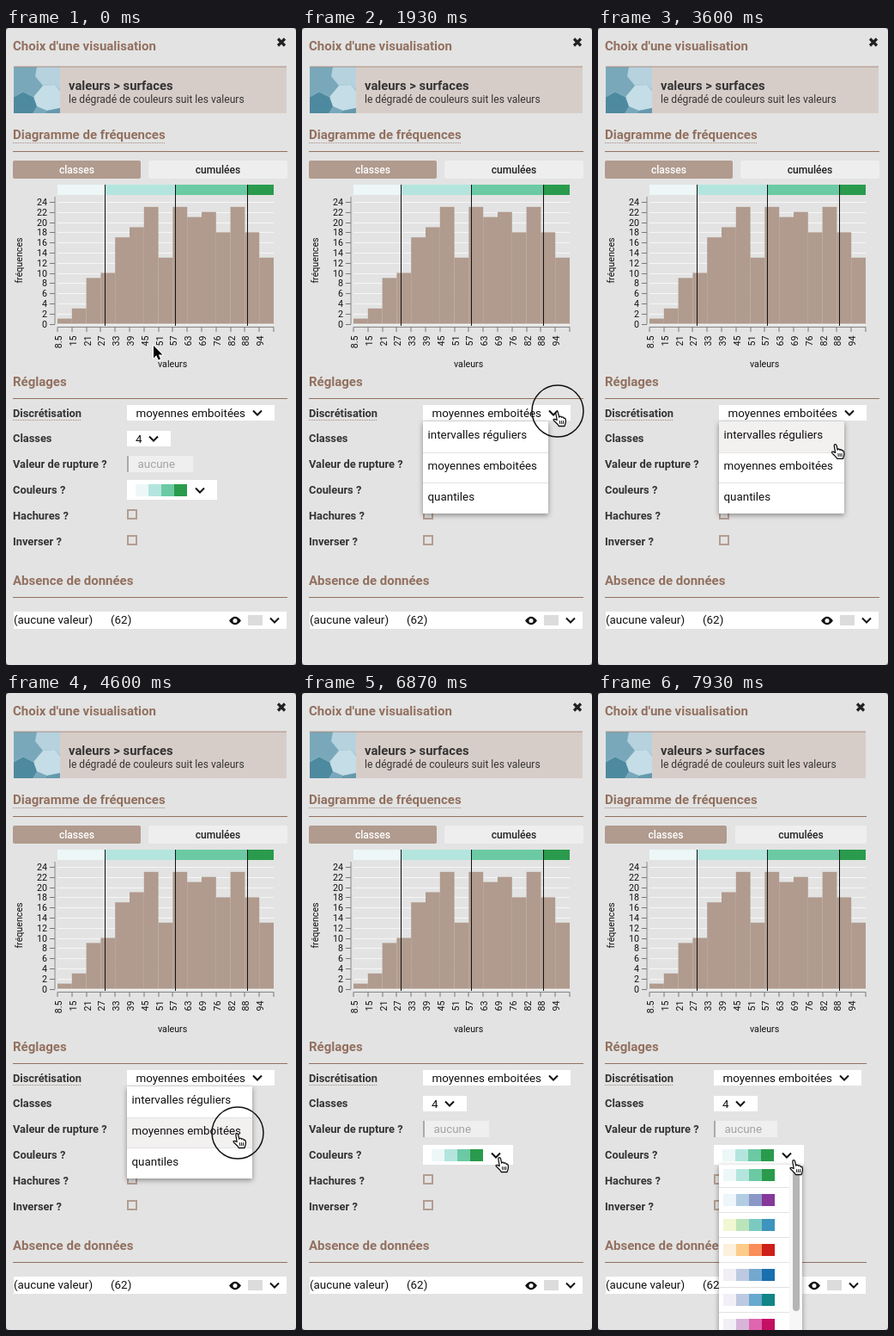
Write an HTML page with a canvas that moves like this. It is 338 px wide and 740 px high and loops after 8 s.

```html
<!DOCTYPE html>
<html lang="fr">
<head>
<meta charset="utf-8">
<title>Choix d'une visualisation</title>
<style>
html, body { margin: 0; width: 100%; height: 100%; overflow: hidden; background: #555; }
canvas { display: block; width: 338px; height: 740px; }
</style>
</head>
<body>
<canvas id="stage"></canvas>
<script>
const W = 338, H = 740, LOOP = 8000;
const canvas = document.getElementById('stage');
const ctx = canvas.getContext('2d');
const ratio = window.devicePixelRatio || 1;
canvas.width = W * ratio;
canvas.height = H * ratio;

const BG = '#e3e3e3', BROWN = '#92705f', TAN = '#b09b8e', INK = '#333';
const GREENS = ['#edf7f8', '#b3e5de', '#6bcaa3', '#2a9b4c'];
const RAMPS = [
  GREENS,
  ['#edf6fa', '#b3cce2', '#8b97c7', '#86389a'],
  ['#f0f7d2', '#bce4bb', '#7bcac2', '#3d94be'],
  ['#fdf0dc', '#fdcc8a', '#fa8d59', '#cc2018'],
  ['#f1eef6', '#bdc9e1', '#74a9cf', '#1a6fae'],
  ['#f3eff7', '#bdc9e1', '#67a9cf', '#118587'],
  ['#f1eef6', '#d7b5d8', '#df65b0', '#c40f62']
];
const COUNTS = [1, 3, 9, 10, 17, 19, 23, 13, 23, 21, 22, 18, 23, 18, 13];
const BINS = ['8.5', 15, 21, 27, 33, 39, 45, 51, 57, 63, 69, 76, 82, 88, 94];
const OPTIONS = ['intervalles réguliers', 'moyennes emboitées', 'quantiles'];

// Menu opening, press and layout times in ms
const MENU_OPEN = 1870, MENU_CLOSE = 4670, RAMP_OPEN = 6930;
const PRESSES = [[1870, 2000], [4530, 4670], [6930, 7070]];

// Pointer stops: time, x, y
const STOPS = [
  [0, 172, 369], [200, 172, 369], [1200, 296, 445], [1950, 296, 445],
  [2550, 277, 476], [3350, 277, 477], [4300, 268, 511], [4750, 268, 511],
  [5700, 237, 528], [6050, 237, 528], [6700, 229, 539], [6950, 229, 539],
  [7500, 227, 542], [8000, 227, 542]
];

const HAND = new Path2D('M5.2 10.5L3.9 3Q3.7 .8 5 .7Q6.3 .6 6.7 2.6L7.7 7.2Q8.2 5.9 9.4 6.2' +
  'Q10.3 6.4 10.5 7.4Q11.2 6.6 12.2 7Q13 7.4 13.2 8.3Q14 7.9 14.7 8.5Q15.6 9.6 15.4 12.5' +
  'Q15.1 15 14 17.5L7.3 17.5Q6.6 15.8 3 12.6Q.8 10.7 1 9.9Q1.6 8.9 3.2 9.6Z');
const FIST = new Path2D('M8.4 11.2L8.8 15M10.5 11.2L10.8 15M12.6 11.2L12.7 15');
const ARROW = new Path2D('M0 0L0 14.4L3.3 11.3L5.6 16.6L8 15.6L5.7 10.4L10.4 10.4Z');

function rect(x, y, w, h, color) {
  ctx.fillStyle = color;
  ctx.fillRect(x, y, w, h);
}

function text(str, x, y, size, color = '#111', weight = 400, align = 'left') {
  ctx.font = `${weight} ${size}px Roboto, sans-serif`;
  ctx.fillStyle = color;
  ctx.textAlign = align;
  ctx.fillText(str, x, y);
}

function turned(str, x, y, align) {
  ctx.save();
  ctx.translate(x, y);
  ctx.rotate(-Math.PI / 2);
  text(str, 0, 0, 10.7, '#111', 400, align);
  ctx.restore();
}

function line(points, color, width = 1) {
  ctx.beginPath();
  points.forEach(([x, y], i) => i ? ctx.lineTo(x, y) : ctx.moveTo(x, y));
  ctx.strokeStyle = color;
  ctx.lineWidth = width;
  ctx.stroke();
}

function shape(points, color) {
  ctx.beginPath();
  points.forEach(([x, y]) => ctx.lineTo(x, y));
  ctx.fillStyle = color;
  ctx.fill();
}

function box(x, y, w, h, r, color) {
  ctx.beginPath();
  ctx.roundRect(x, y, w, h, r);
  ctx.fillStyle = color;
  ctx.fill();
}

function dots(x1, x2, y) {
  ctx.setLineDash([1, 1]);
  line([[x1, y], [x2, y]], '#a08a7e');
  ctx.setLineDash([]);
}

function chevron(x, y) {
  line([[x - 5, y - 2.5], [x, y + 2.5], [x + 5, y - 2.5]], '#111', 2);
}

function ramp(colors, x, y) {
  colors.forEach((c, i) => rect(x + i * 15, y, 15, 14, c));
}

function heading(str, y, right) {
  text(str, 8, y, 15, BROWN, 700);
  rect(8, y + 14, right - 8, 1, BROWN);
}

function shadowBox(x, y, w, h) {
  ctx.save();
  ctx.shadowColor = 'rgba(0,0,0,.4)';
  ctx.shadowBlur = 6 * ratio;
  ctx.shadowOffsetY = 2 * ratio;
  rect(x, y, w, h, '#fff');
  ctx.restore();
}

function card(right) {
  rect(9, 45, right - 10, 54, '#d7cdc8');
  rect(9, 45, 54, 54, '#79a8ba');
  shape([[36, 45], [63, 45], [63, 72], [57, 66], [43, 67], [34, 56]], '#b5d2de');
  shape([[9, 80], [20, 74], [34, 81], [36, 91], [31, 99], [9, 99]], '#4d899f');
  shape([[43, 67], [57, 66], [63, 73], [63, 93], [48, 96], [36, 91], [32, 80]], '#c5dde6');
  shape([[48, 96], [63, 93], [63, 99], [46, 99]], '#6599ae');
  line([[9, 80], [20, 74], [34, 81]], '#94bac8', .7);
  rect(9, 44.5, right - 10, 1, '#a98e81');
  text('valeurs > surfaces', 73, 72, 14.8, INK, 700);
  text('le dégradé de couleurs suit les valeurs', 73, 87, 12.1, INK);
}

function chart() {
  const edges = [60, 115, 197, 281, 312], step = 16.8;
  const yOf = n => 343.5 - n * 5.9;
  edges.slice(0, 4).forEach((x, i) => rect(x, 182, edges[i + 1] - x, 12, GREENS[i]));
  for (let n = 0; n <= 24; n += 2) {
    const y = Math.round(yOf(n)) + .5;
    line([[60, y], [312, y]], '#f6f6f6');
    line([[51, y], [57, y]], '#777');
    text(n, 48, y + 3.5, 10.7, '#111', 400, 'right');
  }
  line([[57, 196], [57, 344]], '#888');
  COUNTS.forEach((n, i) => rect(60 + i * step, yOf(n), step, n * 5.9, TAN));
  line([[60, 347.5], [312, 347.5]], '#888');
  for (let i = 0; i <= 15; i++) {
    const x = Math.round(60 + i * step);
    line([[x, 347.5], [x, 353]], '#777');
    if (i < 15) turned(BINS[i], x + 4.5, 357.5, 'right');
  }
  edges.slice(1, 4).forEach(x => line([[x + .5, 182], [x + .5, 346]], '#111'));
  turned('fréquences', 18.5, 270, 'center');
  text('valeurs', 177, 394, 10.7);
}

function eye(x, y) {
  ctx.beginPath();
  ctx.moveTo(x - 7, y);
  ctx.quadraticCurveTo(x, y - 9.5, x + 7, y);
  ctx.quadraticCurveTo(x, y + 9.5, x - 7, y);
  ctx.fillStyle = '#111';
  ctx.fill();
  ctx.beginPath();
  ctx.arc(x, y, 2.5, 0, 7);
  ctx.fillStyle = '#fff';
  ctx.fill();
}

function settings(narrow, right) {
  const x = narrow ? 135 : 141;
  const labels = ['Discrétisation', 'Classes', 'Valeur de rupture ?', 'Couleurs ?', 'Hachures ?', 'Inverser ?'];
  labels.forEach((s, i) => text(s, 8, 451.5 + i * 29.9, 12.85, INK, 700));
  dots(8, 88, 455.5);

  rect(x, 438, 172, 18, '#fff');
  text('moyennes emboitées', x + 10.5, 452, 13.4);
  chevron(x + 152, 447);

  rect(x, 468, 51, 18, '#fff');
  text('4', x + 10, 482, 13.4);
  chevron(x + 31, 477);

  rect(x, 497, narrow ? 74 : 77, 19, '#efefef');
  rect(x, 497, 2, 19, '#aaa');
  text('aucune', x + 12.5, 511, 13.4, '#a3a3a3');

  rect(x, 525, 105, 23, '#fff');
  ramp(GREENS, x + 10, 530);
  chevron(x + 85, 537);

  ctx.strokeStyle = '#b39d91';
  ctx.lineWidth = 2;
  [560, 590].forEach(y => ctx.strokeRect(x + 1, y, 10, 10));

  rect(9, 678, right - 10, 20, '#fff');
  text('(aucune valeur)', 9, 692, 13.4);
  text('(62)', 122, 692, 13.4);
  eye(right - 61, 688.5);
  rect(right - 46, 682, 17, 12, '#dcdcdc');
  chevron(right - 15, 688);
}

function panel(narrow) {
  const right = narrow ? 313 : 328;
  rect(0, 0, W, H, '#555');
  box(0, 0, W, H, 4, BG);
  text("Choix d'une visualisation", 8, 26, 15, BROWN, 700);
  const cx = right - 7, cy = 16.5;
  line([[cx - 4, cy - 4], [cx + 4, cy + 4]], '#222', 3.2);
  line([[cx - 4, cy + 4], [cx + 4, cy - 4]], '#222', 3.2);
  card(right);

  heading('Diagramme de fréquences', 129, right);
  dots(8, 186, 133.5);
  const first = narrow ? 142 : 149, second = narrow ? 160 : 166;
  box(8, 154, first, 21, 2, TAN);
  box(second, 154, right - second, 21, 2, '#eee');
  text('classes', 8 + first / 2, 169, 12.1, '#fff', 500, 'center');
  text('cumulées', (second + right) / 2, 169, 12.1, '#222', 500, 'center');
  chart();

  heading('Réglages', 416, right);
  heading('Absence de données', 647, right);
  settings(narrow, right);
}

function optionMenu(p) {
  shadowBox(141, 457, 146, 107);
  OPTIONS.forEach((s, i) => {
    const top = 457 + i * 35.7;
    if (p.y > top && p.y <= top + 35.7) rect(141, top, 146, 35.7, '#f3f0f0');
    if (i) rect(141, Math.round(top), 146, 1, '#e2e2e2');
    text(s, 146.5, 477 + i * 36, 13.4);
  });
}

function rampMenu() {
  shadowBox(141, 548, 97, 200);
  RAMPS.forEach((colors, i) => {
    const y = 553 + i * 29;
    ramp(colors, 146, y);
    rect(141, y + 21, 82, 1, '#e2e2e2');
  });
  rect(223, 548, 15, 192, '#f7f7f7');
  box(227, 548, 8, 170, 4, '#b5b5b5');
}

function pointerAt(t) {
  const i = STOPS.findIndex(s => s[0] > t);
  const [t0, x0, y0] = STOPS[i - 1], [t1, x1, y1] = STOPS[i];
  const u = (t - t0) / (t1 - t0), e = u * u * (3 - 2 * u);
  return { x: x0 + (x1 - x0) * e, y: y0 + (y1 - y0) * e };
}

function isClickable(p, menu) {
  const inside = (x, y, w, h) => p.x >= x && p.x <= x + w && p.y >= y && p.y <= y + h;
  return inside(141, 438, 172, 18) || inside(141, 525, 105, 23) ||
    (menu && inside(141, 457, 146, 107));
}

function pointer(p, hand) {
  ctx.save();
  ctx.lineJoin = 'round';
  if (hand) {
    ctx.translate(p.x - 4, p.y);
    ctx.fillStyle = '#fff';
    ctx.fill(HAND);
    ctx.strokeStyle = '#111';
    ctx.lineWidth = 1.3;
    ctx.stroke(HAND);
    ctx.lineWidth = 1;
    ctx.stroke(FIST);
  } else {
    ctx.translate(p.x, p.y);
    ctx.strokeStyle = '#fff';
    ctx.lineWidth = 2;
    ctx.stroke(ARROW);
    ctx.fillStyle = '#000';
    ctx.fill(ARROW);
  }
  ctx.restore();
}

function draw(t) {
  const p = pointerAt(t);
  const menu = t >= MENU_OPEN && t < MENU_CLOSE;
  const ramps = t >= RAMP_OPEN;
  ctx.setTransform(ratio, 0, 0, ratio, 0, 0);
  panel(ramps);
  if (menu) optionMenu(p);
  if (ramps) rampMenu();
  if (PRESSES.some(([a, b]) => t >= a && t < b)) {
    ctx.beginPath();
    ctx.arc(p.x + 2, p.y, 30, 0, 7);
    ctx.strokeStyle = '#111';
    ctx.lineWidth = 1.5;
    ctx.stroke();
  }
  pointer(p, isClickable(p, menu));
}

function tick() {
  draw(performance.now() % LOOP);
  requestAnimationFrame(tick);
}
tick();
</script>
</body>
</html>
```
